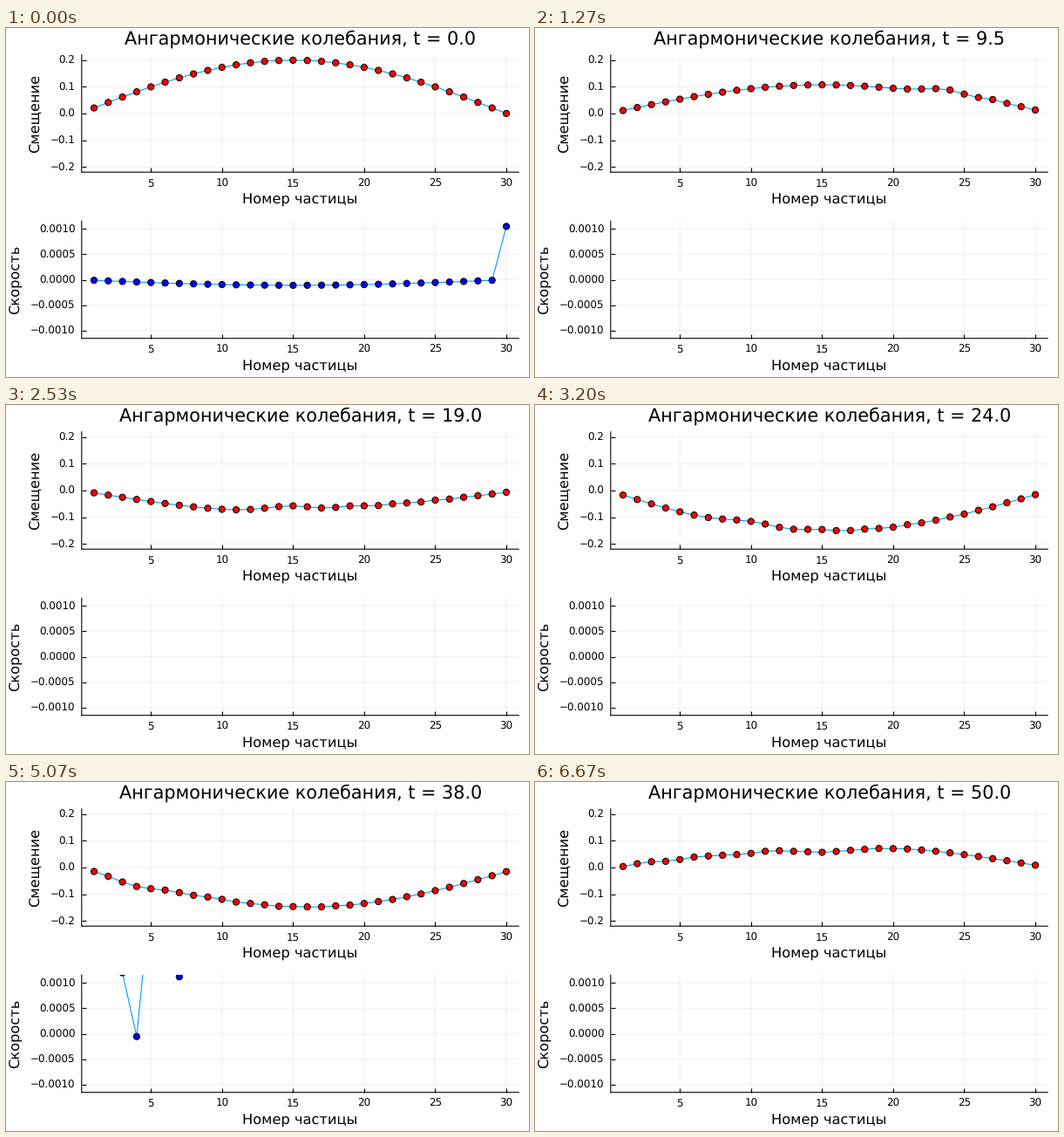
A matplotlib script for the animation above (6740 ms loop, 600 by 400 pixels).

```python
import numpy as np
import matplotlib.pyplot as plt
from matplotlib.animation import FuncAnimation

W, H, DPI = 600, 400, 100
PX = 72 / DPI                      # points per pixel
TITLE, GUIDE, TICK = (1.48 * s * PX for s in (14, 11, 8))

LOOP_MS, TICK_MS = 6740, 20
STATES, STATE_MS = 101, 200 / 3

N, DT, BETA, SKIP = 30, 0.05, 0.1, 10
AMP, VMAX = 0.2, 0.00115

plt.rcParams.update({"font.family": "DejaVu Sans", "text.hinting": "none",
                     "path.snap": False})


def simulate():
    """Chain of N particles with fixed walls and a weak cubic spring term."""
    n = np.arange(1, N + 1)
    x = AMP * np.sin(np.pi * n / N)
    v = np.zeros(N)
    states = []
    for step in range(SKIP * (STATES - 1) + 1):
        stretch = np.diff(np.concatenate(([0], x, [0])))
        v = v + DT * np.diff(stretch + BETA * stretch**3)
        x = x + DT * v
        if step % SKIP == 0:
            states.append((x, v))
    return n, states


def text(x, y, s, size, **kw):
    kw = {"ha": "center", "va": "baseline", **kw}
    return fig.text(x / W, 1 - y / H, s, fontsize=size, color="black", **kw)


def panel(top, ylim, ticks, fmt, label, label_x, color):
    left, width, height = 86.8, 501.4, 134.4
    bottom, mid = top + height, top + height / 2
    ax = fig.add_axes([left / W, 1 - bottom / H, width / W, height / H])
    ax.set_xlim(1 - 0.03 * (N - 1), N + 0.03 * (N - 1))
    ax.set_ylim(-ylim, ylim)
    ax.patch.set_visible(False)
    ax.spines[["top", "right"]].set_visible(False)
    ax.spines[["left", "bottom"]].set_linewidth(1.1 * PX)
    ax.set_xticks(range(5, N + 1, 5))
    ax.set_yticks(ticks)
    ax.tick_params(direction="in", length=5 * PX, width=1.1 * PX,
                   labelleft=False, labelbottom=False)
    ax.set_axisbelow(True)
    ax.grid(color="black", alpha=0.06, linewidth=PX)

    for i in range(5, N + 1, 5):
        text(101 + (i - 1) * 473 / 29, bottom + 16.2, str(i), TICK)
    for t in ticks:
        s = format(t, fmt).replace("-", "\u2212")
        text(79.6, mid - t / ylim * height / 2 + 4.3, s, TICK, ha="right")
    text(337.5, bottom + 36.6, "Номер частицы", GUIDE)
    text(label_x, mid, label, GUIDE, rotation=90, rotation_mode="anchor")

    line, = ax.plot([], [], color="#009afa", lw=1.1 * PX)
    # one colour per dot keeps their positions free of pixel rounding
    dots = ax.scatter(index, 0 * index, s=(7.2 * PX)**2, c=[color] * N,
                      edgecolors="black", linewidths=PX, zorder=3)
    return line, dots


def place(curve, y):
    line, dots = curve
    line.set_data(index, y)
    dots.set_offsets(np.column_stack((index, y)))


index, states = simulate()
fig = plt.figure(figsize=(W / DPI, H / DPI), dpi=DPI, facecolor="white")
title = text(338, 18.6, "", TITLE)
shift = panel(30.8, 0.22, [i / 10 for i in range(-2, 3)], ".1f",
              "Смещение", 38.4, "red")
speed = panel(221.3, VMAX, [i / 2000 for i in range(-2, 3)], ".4f",
              "Скорость", 15.8, "blue")


def draw(frame):
    # states change on a 10 ms grid, so look slightly past the tick's middle
    ms = frame * TICK_MS + TICK_MS / 2 + 4
    k = min(int(ms / STATE_MS), STATES - 1)
    x, v = states[k]
    place(shift, x)
    place(speed, v)
    title.set_text(f"Ангармонические колебания, t = {k / 2:.1f}")
    return *shift, *speed, title


anim = FuncAnimation(fig, draw, frames=LOOP_MS // TICK_MS,
                     init_func=lambda: draw(0), interval=TICK_MS,
                     repeat=True, repeat_delay=0)
plt.show()
```
